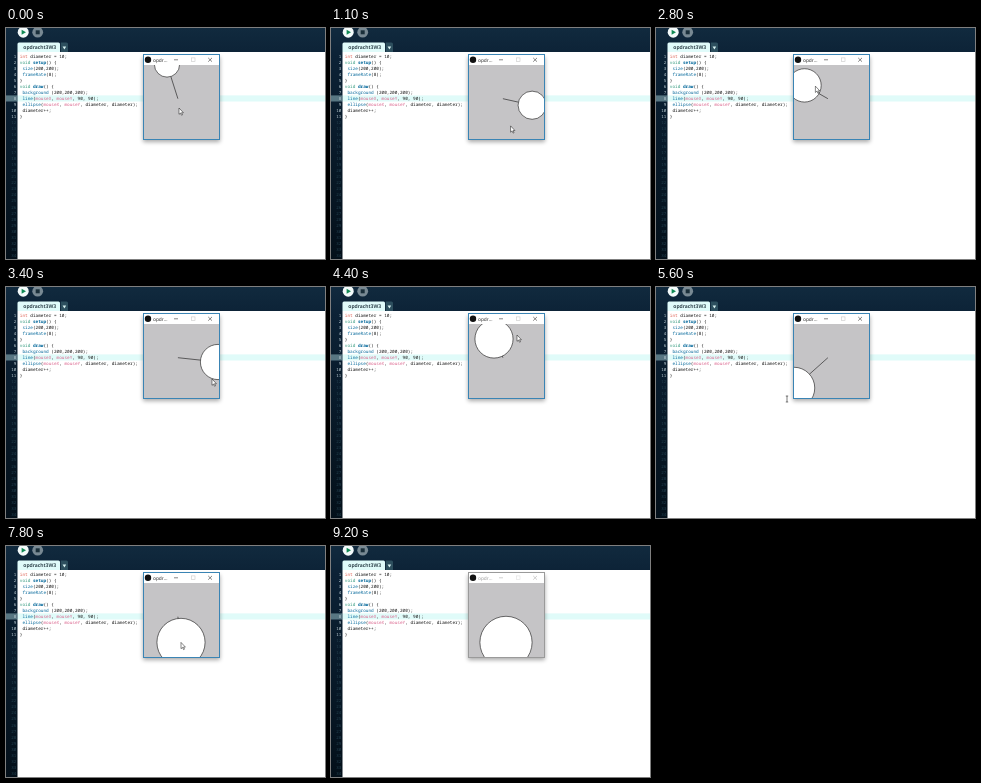
An HTML page for the animation above (9300 ms loop, 319 by 231 pixels).

```html
<!DOCTYPE html>
<html lang="nl">
<head>
<meta charset="utf-8">
<title>Sketch editor</title>
<style>
  html, body { margin: 0; width: 100%; height: 100%; overflow: hidden; background: #fff; }
  svg { display: block; width: 319px; height: 231px; }
  text { white-space: pre; text-rendering: geometricPrecision; }
  .code { font: 4.38px "Noto Sans Mono", "DejaVu Sans Mono", monospace; fill: #111; }
  .code .type { fill: #dd5f52; }
  .code .kw { fill: #33997e; }
  .code .fn { fill: #006699; }
  .code .hook { fill: #006699; font-weight: 700; }
  .code .var { fill: #d9608a; }
  .num { font: 4.2px "Noto Sans Mono", "DejaVu Sans Mono", monospace; text-anchor: end; fill: #24404f; }
  .num.used { fill: #c3d3da; }
  .tab { font: 600 5.1px "Open Sans", "Noto Sans", sans-serif; fill: #10242e; }
  .title { font: 4.8px "Open Sans", "Noto Sans", sans-serif; fill: #222; }
  .ctl { fill: none; stroke: #222; stroke-width: .55; }
  .off { stroke: #c4c4c4; }
  .frame { fill: #fff; stroke: #3a84b4; }
  .idle .frame { stroke: #9a9a9a; }
  .idle .title { fill: #999; }
  .idle .ctl { stroke: #aaa; }
  .idle .ctl.off { stroke: #ddd; }
  .ink { stroke: #111; stroke-width: .6; }
</style>
</head>
<body>
<svg viewBox="0 0 319 231">
  <defs>
    <linearGradient id="chrome" x1="0" y1="0" x2="0" y2="1">
      <stop offset="0" stop-color="#112a3e"/>
      <stop offset=".12" stop-color="#0c2236"/>
      <stop offset="1" stop-color="#04101a"/>
    </linearGradient>
    <clipPath id="view"><rect x="138" y="37" width="75" height="74"/></clipPath>
    <filter id="blur"><feGaussianBlur stdDeviation="2"/></filter>
  </defs>

  <rect width="319" height="231" fill="url(#chrome)"/>
  <rect x="11.5" y="24" width="307.5" height="207" fill="#fff"/>
  <rect x="11.5" y="67.4" width="307.5" height="6.1" fill="#e0fbf9"/>
  <rect y="67.4" width="11.5" height="6.1" fill="#587783"/>

  <circle cx="17.2" cy="4.2" r="5.5" fill="#f4fbfb"/>
  <path d="M15.6 1.8L20 4.3L15.6 6.8Z" fill="#128a55"/>
  <circle cx="31.7" cy="4.2" r="5.4" fill="#788993"/>
  <rect x="29.7" y="2.3" width="4" height="4" fill="#1a2f3a"/>

  <path d="M11.5 24V16Q11.5 14.5 13 14.5H52.5Q54 14.5 54 16V24Z" fill="#e0fbfa"/>
  <text class="tab" x="17.3" y="21.3">opdracht3W3</text>
  <path d="M54.8 24V14.5H60.5Q62 14.5 62 16V24Z" fill="#2d4f5e"/>
  <path d="M56.6 18.4H60.2L58.4 21.4Z" fill="#d9f3f3"/>

  <g id="editor"></g>

  <g id="win">
    <rect x="137" y="29" width="77" height="85" fill="#000" opacity=".34" filter="url(#blur)"/>
    <rect class="frame" x="137.5" y="26.5" width="76" height="85"/>
    <circle cx="142" cy="31.8" r="3.2" fill="#111"/>
    <text class="title" x="147" y="33.5">opdr...</text>
    <path class="ctl" d="M168 31.8H172M202.2 29.9L206 33.7M206 29.9L202.2 33.7"/>
    <rect class="ctl off" x="185.3" y="29.9" width="3.7" height="3.7"/>
    <g clip-path="url(#view)">
      <rect x="138" y="37" width="75" height="75" fill="#c5c4c6"/>
      <line id="line" class="ink" x2="171.9" y2="70.7"/>
      <circle id="disc" class="ink" fill="#fff"/>
    </g>
  </g>

  <path id="arrow" d="M0 0V6.3L1.5 5L2.5 7.2L3.5 6.8L2.5 4.7H4.4Z" fill="#fff" stroke="#111" stroke-width=".5"/>
  <path id="beam" d="M-1.2 -3H1.2M0 -3V3M-1.2 3H1.2" fill="none" stroke="#222" stroke-width=".6"/>
</svg>
<script>
const $ = id => document.getElementById(id);
const NS = 'http://www.w3.org/2000/svg';

// --- editor text -------------------------------------------------------
const code = `int diameter = 10;
void setup() {
 size(200,200);
 frameRate(8);
}
void draw() {
 background (200,200,200);
 line(mouseX, mouseY, 90, 90);
 ellipse(mouseX, mouseY, diameter, diameter);
 diameter++;
}`.split('\n');

const styles = {
  type: /^int$/, kw: /^void$/, hook: /^(setup|draw)$/,
  fn: /^(size|frameRate|background|line|ellipse)$/, var: /^mouse[XY]$/
};

function addText(cls, x, y) {
  const el = document.createElementNS(NS, 'text');
  set(el, { class: cls, x, y });
  return $('editor').appendChild(el);
}

function set(el, attrs) {
  for (const k in attrs) el.setAttribute(k, attrs[k]);
}

for (let row = 0; row < 34; row++) {
  const y = 30 + row * 6.02;
  addText(row < code.length ? 'num used' : 'num', 10.3, y).textContent = row + 1;
  if (row >= code.length) continue;
  const line = addText('code', 13.8, y);
  for (const word of code[row].split(/(\w+)/)) {
    const span = document.createElementNS(NS, 'tspan');
    span.textContent = word;
    set(span, { class: Object.keys(styles).find(k => styles[k].test(word)) || '' });
    line.appendChild(span);
  }
}

// --- pointer -----------------------------------------------------------
// Turning points of the hand movement: seconds, x, y
const path = [
  [-.1, 161, 36.5], [0, 173, 80], [.4, 148, 70], [.7, 195, 44],
  [1, 196, 93], [1.3, 146, 97], [1.9, 189.5, 96], [2.1, 191.5, 95],
  [2.6, 147, 58], [3.275, 212, 75], [3.4, 206, 92], [3.85, 142, 80],
  [4.275, 163, 52], [4.4, 186, 48], [4.85, 188, 96], [5.4, 138, 101],
  [5.6, 131, 112], [5.75, 103, 109], [6.4, 207, 97], [7, 146, 98], [7.5, 175, 96.4]
];

function slope(i, k) {
  const a = path[i - 1], b = path[i + 1];
  return a && b ? (b[k] - a[k]) / (b[0] - a[0]) : 0;
}

// Smooth curve through the turning points, resting on the last one
function pointer(t) {
  const last = path.length - 1;
  if (t >= path[last][0]) return path[last].slice(1);
  const i = Math.max(0, path.findIndex(p => p[0] > t) - 1);
  const p = path[i], q = path[i + 1], h = q[0] - p[0];
  const u = (t - p[0]) / h, v = 1 - u;
  return [1, 2].map(k =>
    p[k] * v * v * (1 + 2 * u) + q[k] * u * u * (3 - 2 * u) +
    h * u * v * (slope(i, k) * v - slope(i + 1, k) * u));
}

// --- playback ----------------------------------------------------------
const LOOP = 9300, RATE = 8, LAG = .1;

function draw(now) {
  const t = Math.floor(now % LOOP / 100) / 10;
  const tick = Math.floor(t * RATE + 1e-6) / RATE;

  // the sketch keeps the last pointer position seen inside its window
  let seen = tick - LAG;
  while (pointer(seen)[0] < 137.9) seen -= 1 / RATE;
  const [cx, cy] = pointer(seen);
  set($('disc'), { cx, cy, r: 12.6 + 1.48 * tick });
  set($('line'), { x1: cx, y1: cy });

  const [x, y] = pointer(t);
  const idle = t > 9.05, inside = x > 136;
  const transform = `translate(${x} ${y})`;
  set($('arrow'), { transform, visibility: !idle && inside ? 'visible' : 'hidden' });
  set($('beam'), { transform, visibility: !idle && !inside ? 'visible' : 'hidden' });
  $('win').classList.toggle('idle', idle);
}

const start = performance.now();
function loop() {
  draw(performance.now() - start);
  requestAnimationFrame(loop);
}
loop();
</script>
</body>
</html>
```
